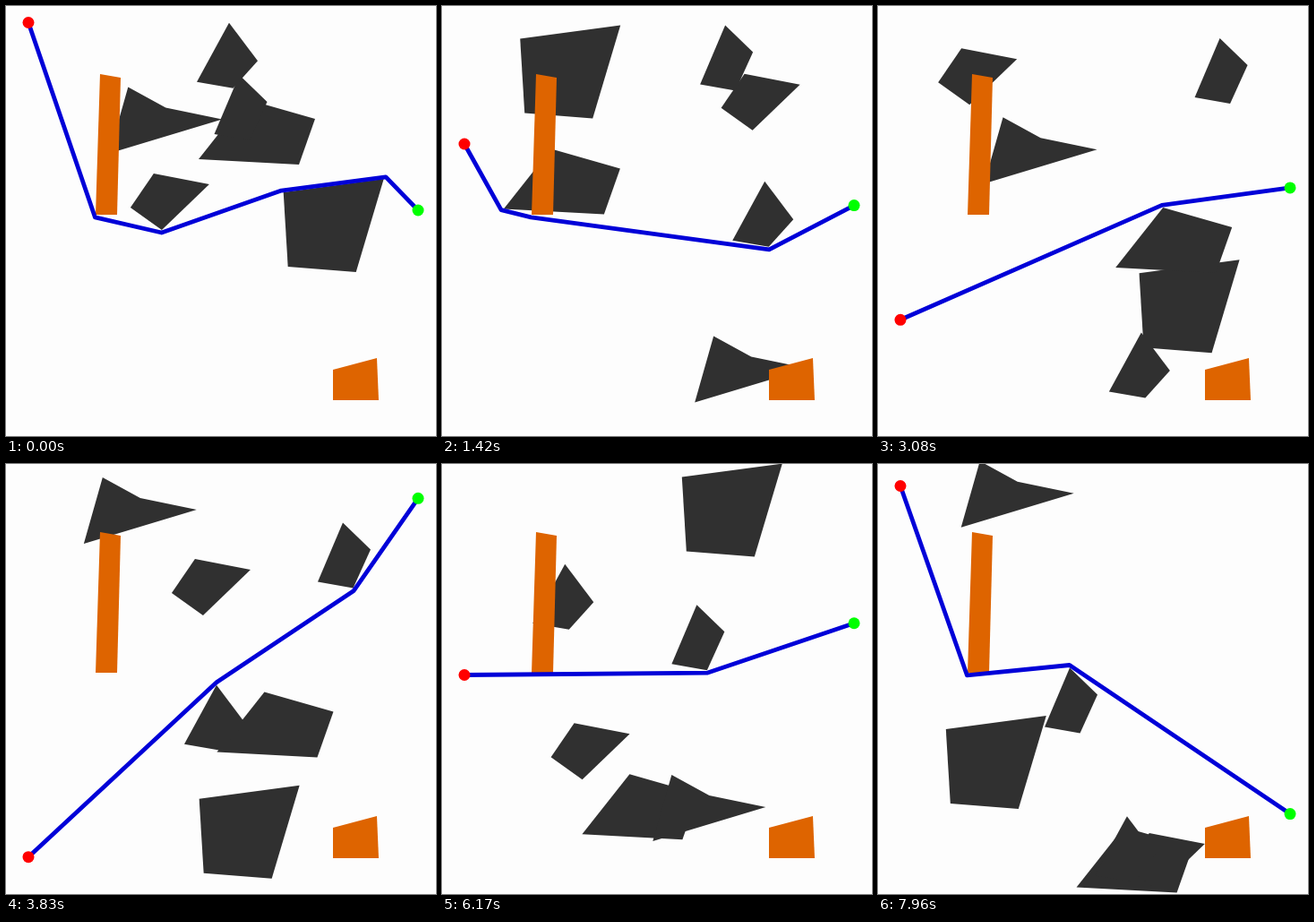
Write an HTML page with a canvas that moves like this. It is 480 px wide and 480 px high and loops after 8 s.

```html
<!DOCTYPE html>
<html lang="en">
<head>
<meta charset="utf-8">
<title>Path around moving obstacles</title>
<style>
html, body { margin: 0; width: 100%; height: 100%; overflow: hidden; background: #fdfdfd; }
canvas { display: block; }
</style>
</head>
<body>
<canvas id="stage" width="480" height="480"></canvas>
<script>
const FRAMES = 192, FPS = 24, SIZE = 480;
const UNIT = 1.636;                 // pixels per step for a speed of 1
const AREA = { x: [58.5, 424.5], y: [-4, 484] };
const END_RANGE = [2.8, 474.5];
const CLEARANCE = 3;                // room between the route and a corner
const EDGE = 40;                    // the route does not bend this close to the border
const NEAR = 25, DETOUR = 100;      // cost of a corner that is not near the previous route
const ctx = document.getElementById('stage').getContext('2d');

const movers = [
  { at: [309.7, 207.9], speed: [-4, -4], outline: [[0, 0], [112, -15], [81, 89], [5, 83]] },
  { at: [268, 104], speed: [-3, 1], outline: [[0, 0], [77, 22], [59, 73], [-53, 67]] },
  { at: [164.9, 187], speed: [4, -2], outline: [[0, 0], [62, 12], [9, 63], [-26, 38]] },
  { at: [136.3, 90.4], speed: [3, 5], outline: [[0, 0], [42, 23], [105, 36], [-21, 74]] },
  { at: [260.5, 77], speed: [1, -1], outline: [[0, 0], [31, 30], [11.5, 73], [-28, 66]] },
  { at: [249, 18.7], speed: [2, -4], outline: [[0, 0], [32, 42.5], [4.5, 73], [-36, 66]] }
];
const walls = [
  [[105, 76], [128, 80], [124, 233], [100, 233]],
  [[365, 406], [414, 393], [416, 440], [365, 440]]
];

// Motion: everything bounces between two limits at constant speed.
function bounce(from, speed, step, [low, high]) {
  const range = high - low, period = 2 * range;
  const u = ((from + speed * UNIT * step - low) % period + period) % period;
  return low + range - Math.abs(u - range);
}

function place({ at, speed, outline }, step) {
  const [dx, dy] = [AREA.x, AREA.y].map(([low, high], axis) => {
    const extent = outline.map(p => p[axis]);
    const limits = [low - Math.min(...extent), high - Math.max(...extent)];
    return bounce(at[axis], speed[axis], step, limits);
  });
  return outline.map(([x, y]) => [x + dx, y + dy]);
}

const scene = step => ({
  shapes: movers.map(mover => place(mover, step)),
  start: [25, bounce(18.5, -3, step, END_RANGE)],
  goal: [460, bounce(228, -8, step, END_RANGE)]
});

// Geometry
const distance = (a, b) => Math.hypot(a[0] - b[0], a[1] - b[1]);
const side = (a, b, c) => (b[0] - a[0]) * (c[1] - a[1]) - (b[1] - a[1]) * (c[0] - a[0]);
const crosses = (a, b, c, d) =>
  side(a, b, c) * side(a, b, d) < 0 && side(c, d, a) * side(c, d, b) < 0;
const edges = poly => poly.map((p, i) => [p, poly[(i + 1) % poly.length]]);

function inside([x, y], poly) {
  const hits = edges(poly).filter(([a, b]) => a[1] > y !== b[1] > y &&
    x < a[0] + (b[0] - a[0]) * (y - a[1]) / (b[1] - a[1]));
  return hits.length % 2 === 1;
}

function grow(poly, margin) {
  const center = [0, 1].map(axis => poly.reduce((sum, p) => sum + p[axis], 0) / poly.length);
  return poly.map(p => {
    const scale = 1 + margin / distance(p, center);
    return p.map((v, axis) => center[axis] + (v - center[axis]) * scale);
  });
}

function distanceToLine(p, line) {
  return Math.min(...line.slice(1).map((b, i) => {
    const a = line[i], dx = b[0] - a[0], dy = b[1] - a[1];
    const t = ((p[0] - a[0]) * dx + (p[1] - a[1]) * dy) / (dx * dx + dy * dy);
    const u = Math.min(1, Math.max(0, t));
    return distance(p, [a[0] + u * dx, a[1] + u * dy]);
  }));
}

// Shortest clear route around the corners, preferring the sides taken before.
function findRoute({ shapes, start, goal }, previous) {
  const obstacles = shapes.concat(walls);
  const barriers = obstacles.flatMap(edges);
  const clear = (a, b) => !barriers.some(([c, d]) => crosses(a, b, c, d));
  const corners = obstacles.flatMap(poly => grow(poly, CLEARANCE)).filter(p =>
    p[1] > EDGE && p[1] < SIZE - EDGE && !obstacles.some(poly => inside(p, poly)));
  const node = (point, cost, extra) => ({ point, cost, extra, from: null, done: false });
  const target = node(goal, Infinity, 0);
  const nodes = [node(start, 0, 0), target, ...corners.map(p =>
    node(p, Infinity, previous && distanceToLine(p, previous) > NEAR ? DETOUR : 0))];

  while (!target.done) {
    const open = nodes.filter(n => !n.done && n.cost < Infinity);
    if (!open.length) return [start, ...(previous || []).slice(1, -1), goal];
    const best = open.reduce((a, b) => b.cost < a.cost ? b : a);
    best.done = true;
    for (const next of nodes) {
      const cost = best.cost + distance(best.point, next.point) + next.extra;
      if (!next.done && cost < next.cost && clear(best.point, next.point)) {
        next.cost = cost;
        next.from = best;
      }
    }
  }
  const route = [];
  for (let n = target; n; n = n.from) route.unshift(n.point);
  return route;
}

// The route depends on the one before, so the whole loop is planned once.
const scenes = [];
for (let step = 0, route; step < FRAMES; step++) {
  const now = scene(step);
  route = findRoute(now, route);
  scenes.push({ ...now, route });
}

// Drawing
function trace(points) {
  ctx.beginPath();
  points.forEach(p => ctx.lineTo(p[0], p[1]));
}
function fillPoly(poly, color) {
  trace(poly);
  ctx.fillStyle = color;
  ctx.fill();
}
function dot([x, y], color) {
  ctx.beginPath();
  ctx.arc(x, y, 6.5, 0, 2 * Math.PI);
  ctx.fillStyle = color;
  ctx.fill();
}

function draw(time) {
  const step = Math.floor(time * FPS / 1000 + 0.13) % FRAMES;
  const { shapes, start, goal, route } = scenes[step];
  ctx.fillStyle = '#fdfdfd';
  ctx.fillRect(0, 0, SIZE, SIZE);
  shapes.forEach(poly => fillPoly(poly, '#303030'));
  walls.forEach(poly => fillPoly(poly, '#de6400'));
  trace(route);
  ctx.strokeStyle = '#0000d8';
  ctx.lineWidth = 4.8;
  ctx.lineJoin = 'round';
  ctx.stroke();
  dot(start, '#ff0000');
  dot(goal, '#00ff00');
}

let origin;
function tick(now) {
  origin ??= now;
  draw(now - origin);
  requestAnimationFrame(tick);
}
draw(0);
requestAnimationFrame(tick);
</script>
</body>
</html>
```
